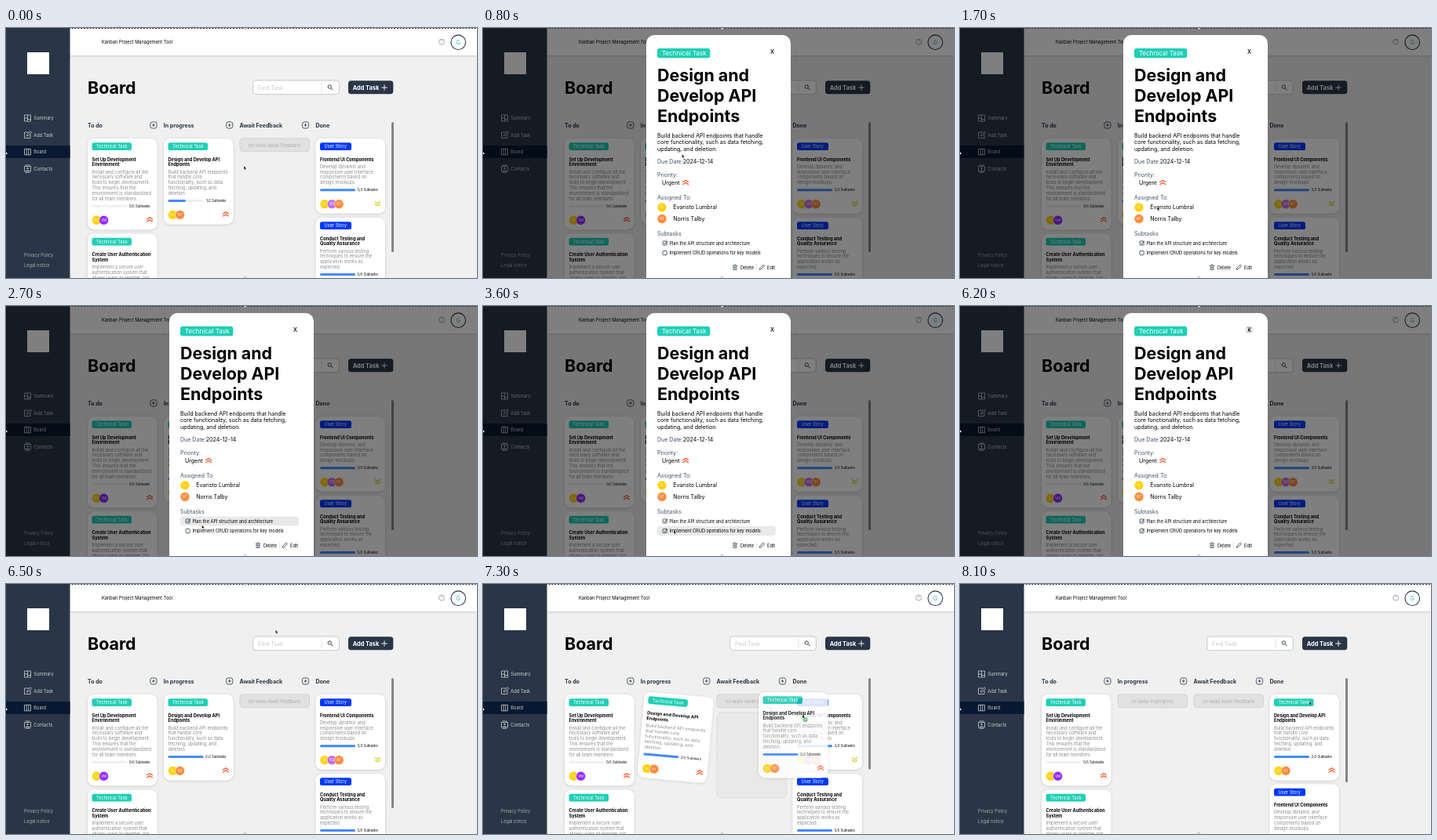
Recreate the animation shown at these times as an HTML page. Size 600 by 319 pixels, loop 8200 ms.

```html
<!DOCTYPE html>
<html lang="en">
<head>
<meta charset="utf-8">
<title>Kanban board</title>
<style>
html, body { margin: 0; width: 100%; height: 100%; overflow: hidden; background: #f0f0f0; }
svg { display: block; width: 100vw; height: 100vh; font-family: Inter, "Liberation Sans", sans-serif; }
text { white-space: pre; }
</style>
</head>
<body>
<svg id="stage" viewBox="0 0 600 319"></svg>
<script>
const LOOP = 8200, STEP = 100;
const NAVY = '#2a3647', TEAL = '#1fcfb5', BLUE = '#0038ff';
const YELLOW = '#ffd20a', PURPLE = '#9327ff', ORANGE = '#ff8a3c', LILAC = '#c36be6';
const S = 5.65, M = 7.06, XL = 21.4, LINE = 6.84;
const OPEN = 600, CHECK = 3300, CLOSE = 6300, GRAB = 6900, LEAVE = 7100, ENTER = 7400, DROP = 7800;
const HOME = [201, 141], DONE = [394.5, 141], GRIP = [257, 170];

const cat = (parts) => parts.reduce((all, p) => all + p, '');
// y is the middle of the capitals
const text = (x, y, s, size = S, fill = '#000', more = '') =>
  `<text x="${x}" y="${y + size * 0.36}" font-size="${size}" fill="${fill}" ${more}>${s}</text>`;
const BOLD = 'font-weight="700"', MID = 'text-anchor="middle"';
const rect = (x, y, w, h, r, fill, more = '') =>
  `<rect x="${x}" y="${y}" width="${w}" height="${h}" rx="${r}" fill="${fill}" ${more}/>`;
const circle = (x, y, r, fill, more = '') =>
  `<circle cx="${x}" cy="${y}" r="${r}" fill="${fill}" ${more}/>`;
const line = (d, color, w = 0.7, more = '') =>
  `<path d="${d}" fill="none" stroke="${color}" stroke-width="${w}" ${more}/>`;
const group = (id, body, more = '') => `<g id="${id}" ${more}>${body}</g>`;

const avatar = (x, y, color, initials) =>
  circle(x, y, 5.9, color, 'stroke="#fff" stroke-width=".5"') + text(x, y, initials, 4.2, '#fff', MID);
const chevrons = (x, y, color, dir) => cat([0, 3].map(o =>
  line(`M${x - 3.4} ${y + dir * (2.6 - o)}L${x} ${y + dir * (0.4 - o)}L${x + 3.4} ${y + dir * (2.6 - o)}`,
    color, 1.2, 'stroke-linecap="round"')));
const urgent = (x, y) => chevrons(x, y, '#ff4d1c', 1);
const low = (x, y) => chevrons(x, y, '#cfd41f', -1);

function card(x, y, c) {
  const story = c.type === 'User Story';
  const descY = 35.7 + (c.title.length - 1) * LINE;
  const barY = descY + (c.desc.length - 1) * LINE + 9.5;
  const out = [
    rect(0, 0, 88.5, barY + 30, 8.5, '#fff', 'filter="url(#shadow)"'),
    rect(5.5, 5.2, story ? 40 : 50.5, 9.8, 2.6, story ? BLUE : TEAL),
    text(11, 10.1, c.type, S, '#fff'),
    ...c.title.map((s, i) => text(5.5, 26.5 + i * LINE, s, S, '#000', BOLD)),
    ...c.desc.map((s, i) => text(5.5, descY + i * LINE, s, S, '#8c8c8c')),
    rect(5.5, barY - 1.5, 45, 3, 1.5, '#efefef'),
    rect(5.5, barY - 1.5, 45 * c.done / c.total, 3, 1.5, '#4589ff', c.live ? 'id="bar"' : ''),
    `<text x="79.3" y="${barY + 1.5}" font-size="4.24" text-anchor="end" ${c.live ? 'id="count"' : ''}>${c.done}/${c.total} Subtasks</text>`,
    ...c.people.map((p, i) => avatar(11.5 + i * 9.1, barY + 18, ...p)),
    c.low ? low(79, barY + 17.5) : urgent(79, barY + 17)
  ];
  return `<g transform="translate(${x} ${y})">${cat(out)}</g>`;
}

const EL = [YELLOW, 'EL'], NT = [ORANGE, 'NT'], VM = [PURPLE, 'VM'], KD = [LILAC, 'KD'];
const setup = {
  type: 'Technical Task', title: ['Set Up Development', 'Environment'],
  desc: ['Install and configure all the', 'necessary software and', 'tools to begin development.',
    'This ensures that the', 'environment is standardized', 'for all team members.'],
  done: 0, total: 5, people: [EL, VM]
};
const login = {
  type: 'Technical Task', title: ['Create User Authentication', 'System'],
  desc: ['Implement a secure user', 'authentication system that', 'allows users to register, log', 'in, and log out.'],
  done: 0, total: 3, people: [EL]
};
const api = {
  type: 'Technical Task', title: ['Design and Develop API', 'Endpoints'],
  desc: ['Build backend API endpoints', 'that handle core', 'functionality, such as data', 'fetching, updating, and', 'deletion.'],
  done: 1, total: 2, people: [EL, NT], live: true
};
const frontend = {
  type: 'User Story', title: ['Frontend UI Components'],
  desc: ['Develop dynamic and', 'responsive user interface', 'components based on', 'design mockups.'],
  done: 3, total: 3, people: [EL, KD, NT], low: true
};
const testing = {
  type: 'User Story', title: ['Conduct Testing and', 'Quality Assurance'],
  desc: ['Perform various testing', 'techniques to ensure the', 'application works as', 'expected.'],
  done: 5, total: 5, people: [EL, NT], low: true
};

const plus = (x, y, r, color, w) => line(`M${x - r} ${y}h${2 * r}M${x} ${y - r}v${2 * r}`, color, w);
const empty = (id, x, name) => group(id,
  rect(x, 140.8, 88.5, 17, 4, '#e1e1e1', 'stroke="#c4c4c4" stroke-width=".6"') +
  text(x + 44.2, 149.5, `no tasks ${name}`, S, '#adadad', MID));
const slot = (id, x, y) => group(id,
  rect(x, y, 88.5, 109, 6, '#e9e9e9', 'stroke="#c4c4c4" stroke-width=".7" stroke-dasharray="2 1.4"'));

function sidebar() {
  const c = '#cdcdcd', icon = (d) => line(d, c, 0.8);
  const items = ['Summary', 'Add Task', 'Board', 'Contacts'];
  return rect(0, 0, 81.5, 319, 0, NAVY) +
    rect(27, 31, 28, 28, 0, '#fff') +
    rect(0, 150, 81.5, 16, 0, '#091931') +
    cat(items.map((s, i) => text(35.3, 115 + i * 21.5, s, S, c))) +
    icon('M23.5 111h8v8h-8zM27.5 111v8M23.5 115h4M27.5 116.5h4') +
    icon('M29 133h-5.5v7.5h7.5v-5M26.5 138l.4-2l4.2-4.2l1.5 1.5l-4.2 4.2z') +
    icon('M23.5 154.3h8v7.5h-8zM26.2 154.3v7.5M28.8 154.3v7.5') +
    icon('M23.5 176.5h8v6.3h-8zM24.5 175h6M24.5 184.3h6M25.5 182.6q2-2.4 4 0') +
    circle(27.5, 179, 1.1, c) +
    text(23, 290, 'Privacy Policy', S, '#a8a8a8') + text(23, 302.5, 'Legal notice', S, '#a8a8a8');
}

function header() {
  return rect(81.5, 0, 518.5, 35, 0, '#fff', 'filter="url(#shadow)"') +
    text(122, 18, 'Kanban Project Management Tool') +
    circle(555, 17.6, 3.5, 'none', 'stroke="#7d8694" stroke-width=".7"') +
    text(555, 17.6, '?', 5, '#7d8694', MID) +
    circle(576.2, 18.2, 9.3, '#fff', `stroke="${NAVY}" stroke-width="1.1"`) +
    text(576.2, 18.2, 'G', M, '#29b5d8', MID);
}

function board() {
  const heads = ['To do', 'In progress', 'Await Feedback', 'Done'];
  return text(104, 76.5, 'Board', XL, '#000', BOLD) +
    rect(314.8, 67, 109.5, 17.7, 3.6, '#fff', 'stroke="#a8a8a8" stroke-width=".6"') +
    text(321, 76, 'Find Task', M, '#c8c8c8') + line('M402 69.5v13', '#d1d1d1', 0.6) +
    circle(412.3, 75, 2.2, 'none', `stroke="${NAVY}" stroke-width=".9"`) +
    line('M414 76.7l2.5 2.5', NAVY, 1) +
    rect(436, 67.3, 57.3, 17, 3.6, NAVY) +
    text(441.7, 76, 'Add Task', 7.4, '#fff', BOLD) + plus(482, 76, 3.7, '#fff', 0.9) +
    cat(heads.map((s, i) => text(104 + i * 96.8, 124.2, s, M, NAVY, BOLD) + (i < 3 ?
      rect(183.8 + i * 96.8, 119.8, 8.2, 8.2, 2.6, 'none', `stroke="${NAVY}" stroke-width=".8"`) +
      plus(187.9 + i * 96.8, 123.9, 2, NAVY, 0.8) : ''))) +
    card(104, 141, setup) + card(104, 262.5, login) +
    empty('noProgress', 201, 'In progress') + empty('noAwait', 298, 'Await Feedback') +
    slot('slotProgress', 201, 255.5) + slot('slotAwait', 298, 164) +
    group('doneList', card(394.5, 141, frontend) + card(394.5, 242, testing)) +
    '<use id="placed" href="#task"/>' +
    rect(491, 120, 3, 166, 1.5, '#858585', 'id="scroll"') +
    '<use id="ghost" href="#task" opacity=".86"/>';
}

const box = (y) => rect(229, y - 2.6, 5.2, 5.2, 1.1, 'none', `stroke="${NAVY}" stroke-width=".8"`);
const tick = (y) => line(`M230.3 ${y - 0.3}l1.4 1.5l3-4`, NAVY, 0.9);
const hover = (id, y) => rect(222, y - 6, 151, 12, 3.5, '#e9e9e9', `id="${id}"`);

function dialog() {
  const slate = '#42526e', head = ['Design and', 'Develop API', 'Endpoints'];
  const desc = ['Build backend API endpoints that handle', 'core functionality, such as data fetching,', 'updating, and deletion.'];
  return rect(0, 0, 600, 319, 0, '#000', 'opacity=".5"') +
    rect(208, 9, 184, 330, 10.6, '#fff') +
    rect(222, 26, 67.3, 12.3, 2.8, TEAL) + text(227.7, 32.2, 'Technical Task', 8.1, '#fff') +
    circle(368.4, 30.3, 5, '#e2e2e2', 'id="hoverX"') + text(368.4, 30.3, 'X', M, '#000', MID + ' font-weight="500"') +
    cat(head.map((s, i) => text(222, 60 + i * 26, s, XL, '#000', BOLD))) +
    cat(desc.map((s, i) => text(222, 137 + i * 8.6, s, M))) +
    text(222, 170.8, 'Due Date:<tspan fill="#000">2024-12-14</tspan>', M, slate) +
    text(222, 187.5, 'Priority:', M, slate) + text(228, 197.5, 'Urgent', M) + urgent(258.2, 197) +
    text(222, 216, 'Assigned To:', M, slate) +
    avatar(228, 228.8, ...EL) + text(242.2, 228.8, 'Evaristo Lumbral', M) +
    avatar(228, 243.5, ...NT) + text(242.2, 243.5, 'Norris Talby', M) +
    text(222, 262.2, 'Subtasks', M, slate) +
    hover('hover1', 274.5) + hover('hover2', 287) +
    box(274.5) + tick(274.5) + text(237.4, 274.5, 'Plan the API structure and architecture') +
    box(287) + group('tick2', tick(287)) + text(237.4, 287, 'Implement CRUD operations for key models') +
    line('M318 303h6M319 303v5.5h4v-5.5M320 302h2M320.3 304.3v3M321.7 304.3v3', NAVY, 0.7) +
    text(328, 305.5, 'Delete') + line('M348.5 301v9', '#d1d1d1', 0.6) +
    line('M352.3 308.3l.4-1.9l4.3-4.3l1.5 1.5l-4.3 4.3z', NAVY, 0.8) + text(362, 305.5, 'Edit');
}

const knob = (x, y) => circle(x, y, 1.2, '#fff', 'stroke="#555" stroke-width=".4"');
const frame = line('M0 .5H600', '#333', 1, 'stroke-dasharray="2.2 1.6"') + knob(304.5, 0.8) + knob(304.5, 318.5) + knob(0.4, 160);
const cursor = '<path d="M0 0L0 4.6L1.1 3.7L1.9 5.4L2.7 5L1.9 3.4L3.3 3.3Z" fill="#000" stroke="#fff" stroke-width=".4"/>' +
  group('copy', circle(3.6, 6.2, 2.9, '#3fae49', 'stroke="#fff" stroke-width=".5"') + plus(3.6, 6.2, 1.6, '#fff', 0.8));

const stage = document.getElementById('stage');
stage.innerHTML = `<defs>
  <filter id="shadow" x="-20%" y="-20%" width="140%" height="140%">
    <feDropShadow dx="0" dy="0.6" stdDeviation="1.6" flood-color="#000" flood-opacity=".2"/>
  </filter>
  ${group('task', card(0, 0, api))}</defs>` +
  rect(0, 0, 600, 319, 0, '#f0f0f0') + header() + sidebar() + board() +
  group('dialog', dialog()) + frame + group('cursor', cursor);

const el = {};
stage.querySelectorAll('[id]').forEach(n => el[n.id] = n);
const show = (id, on) => el[id].setAttribute('display', on ? 'inline' : 'none');
const place = (id, x, y, more = '') => el[id].setAttribute('transform', `translate(${x} ${y})${more}`);

const path = [
  [0, 303, 176], [500, 253.5, 161], [1100, 253.5, 161], [2200, 249.5, 279.5], [2800, 249.5, 279.5],
  [3100, 243, 286], [3700, 243, 286], [4400, 414.5, 52.5], [5300, 414.5, 52.5], [5900, 367, 28],
  [6350, 367, 28], [6850, ...GRIP], [GRAB, ...GRIP], [7300, 407, 167], [7700, 445, 150], [LOOP, 445, 150]
];
function pointer(t) {
  const i = path.findIndex(p => p[0] > t), a = path[i - 1], b = path[i];
  const k = (t - a[0]) / (b[0] - a[0]), e = k * k * (3 - 2 * k);
  return [a[1] + (b[1] - a[1]) * e, a[2] + (b[2] - a[2]) * e];
}

function draw(t) {
  const [x, y] = pointer(t);
  const drag = t >= GRAB && t < DROP, dropped = t >= DROP, checked = t >= CHECK;
  place('cursor', x, y);
  show('copy', drag);
  show('dialog', t >= OPEN && t < CLOSE);
  const inRow = x > 222 && x < 373;
  show('hover1', inRow && y > 268.5 && y < 280.5);
  show('hover2', inRow && y > 281 && y < 293);
  show('hoverX', Math.hypot(x - 368.4, y - 30.3) < 6);
  show('tick2', checked);
  el.bar.setAttribute('width', checked ? 45 : 22.5);
  el.count.textContent = `${checked ? 2 : 1}/2 Subtasks`;

  place('placed', ...(dropped ? DONE : HOME), drag ? ' rotate(5 44.2 54.5)' : '');
  show('ghost', drag);
  place('ghost', HOME[0] + x - GRIP[0], HOME[1] + y - GRIP[1]);
  show('noProgress', dropped);
  show('slotProgress', drag && t < LEAVE);
  show('slotAwait', t >= LEAVE && t < ENTER);
  place('doneList', 0, dropped ? 114.5 : 0);
  el.scroll.setAttribute('height', drag ? 116.5 : dropped ? 133 : 166);
}

const start = performance.now();
function run(now) {
  const t = Math.max(0, now - start) % LOOP;
  draw(Math.floor(t / STEP) * STEP);
  requestAnimationFrame(run);
}
draw(0);
requestAnimationFrame(run);
</script>
</body>
</html>
```
